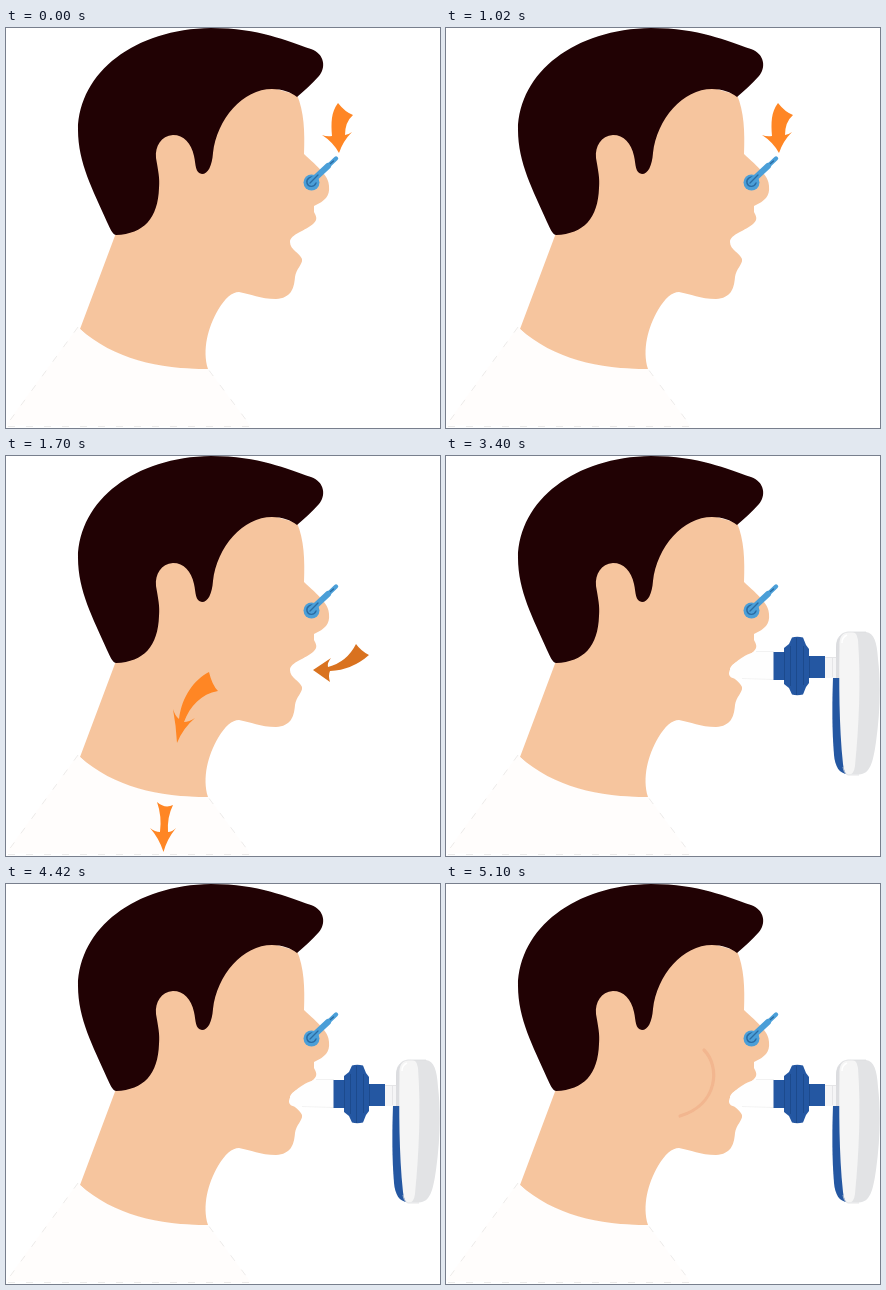
An HTML page with a canvas for the animation above (6800 ms loop, 434 by 400 pixels).

```html
<!DOCTYPE html>
<html lang="en">
<head>
<meta charset="utf-8">
<style>
html, body { margin: 0; width: 100%; height: 100%; overflow: hidden; background: #fff; }
canvas { display: block; }
</style>
</head>
<body>
<canvas id="stage" width="434" height="400"></canvas>
<script>
const ctx = document.getElementById('stage').getContext('2d');
const STEP = 1700;
const ORANGE = '#ff8624', RUST = '#d9721f', BLUE = '#2457a2', NAVY = '#1b4788';
const SKY = '#4b9fd8', STEEL = '#2a6ca3';

function fill(color, d) {
  ctx.fillStyle = color;
  ctx.fill(new Path2D(d));
}

function line(color, width, d) {
  ctx.strokeStyle = color;
  ctx.lineWidth = width;
  ctx.stroke(new Path2D(d));
}

function disc(color, x, y, r) {
  ctx.fillStyle = color;
  ctx.beginPath();
  ctx.arc(x, y, r, 0, Math.PI * 2);
  ctx.fill();
}

function drawPerson() {
  // neck and face
  fill('#f6c59e', `M110 205L74 301C105 332 150 342 202 341
    C196 322 202 299 212 282C219 270 226 264 233 264
    C245 266 254 271 270 271C285 270 288 261 289 249
    C290 241 297 236 296 231C294 225 284 222 284 214
    C284 206 300 203 308 195C312 191 310 188 308 184L308 178
    C319 173 324 168 323 158C323 148 312 139 298 126
    C299 104 298 83 291 67L200 40L130 110Z`);
  // hair
  fill('#210204', `M110 207C106 206 104 200 101 194C87 162 72 135 72 102
    C73 44 129 1 205 0C254 0 280 13 305 21C319 26 320 40 313 48
    C306 56 298 63 291 69C285 64 276 61 266 61C237 61 211 91 207 125
    C206 138 202 146 196 146C189 145 190 137 188 128
    C185 115 178 107 167 107C155 108 149 118 150 130
    C152 142 154 150 153 160C152 190 138 206 110 207Z`);
  // shirt
  fill('#fffdfc', 'M72 299L0 397L245 399L202 341C152 341 108 331 74 301Z');
  ctx.setLineDash([7, 11]);
  line('#e4e2e1', 0.7, 'M72 299L1 396.500M2 398.500H245L202 341');
  ctx.setLineDash([]);
}

function drawClip() {
  ctx.lineCap = 'round';
  disc(SKY, 305.500, 154.500, 8);
  line(STEEL, 1.400, 'M309 150C305 147 300 151 301 155C302 159 308 160 310 155');
  line(SKY, 6, 'M307 152L322 138');
  line(SKY, 4.400, 'M320 140L330 130.500');
  line(STEEL, 1.300, 'M304 155L312 147M324.500 135.500L327.500 133');
  ctx.lineCap = 'butt';
}

function drawBreath() {
  fill(RUST, `M350 188Q355 195 363 199Q346 214 324 215Q322 219 324 226
    L307 214L325 202Q321 207 322 211Q341 206 350 188Z`);
  fill(ORANGE, `M203 216Q206 229 212 235C195 238 184 250 178 266
    Q183 266 189 262Q177 272 171 287Q170 269 167 253Q169 260 173 263
    C176 240 188 224 203 216Z`);
  fill(ORANGE, `M151 346Q159 353 167 349Q161 361 162 376Q166 376 170 372
    Q161 383 157.500 396Q153 382 144 372Q149 376 154 376Q156 360 151 346Z`);
}

function drawDevice() {
  // mouthpiece
  fill('#fefefe', 'M328 195H312C298 198 283 209 283 218C284 224 293 223 302 222L328 224Z');
  line('#eeeeee', 0.7, 'M328 195.500H310M296 222.500L328 223.500');
  // filter
  fill(BLUE, `M327.500 196H338V192L343 188L346 181.500Q351 180 357 181.500L360 189L363 193V200H379V222
    H363V227L360 231L357 238.500Q351 240 346 238.500L343 232L338 228V224H327.500Z`);
  line(NAVY, 0.8, 'M338.500 196V224M344.500 190V230M350.500 182V239M357.500 190V229M363.500 200V222');
  fill('#f5f5f6', 'M379 201H392V222H379Z');
  line('#dedfe1', 0.7, 'M379 201.500H391M386.500 202V221');
  // meter
  fill('#dcdde0', 'M390 224V192Q390 181 398 177V224Z');
  fill(BLUE, 'M387 222H396L402 318C393 318 389 310 388 299C386 275 386 248 387 222Z');
  fill('#e2e3e5', `M405 176L420 176C428 177 431 186 432 203C435 227 434 258 430 286
    C427 307 424 318 413 318.500H403Z`);
  fill('#f5f5f5', `M393.500 190C393 181 396 177 402 176Q411 174 412 184
    C415 225 413 270 409 310Q408 319 402 319Q398 318 397 308C393 270 393 225 393.500 190Z`);
  line('#d8dadd', 0.7, `M390.500 201V190C391 181 395 177 402 176L420 176
    M397 311Q398 318 402 319H413`);
  line('#ffffff', 1.500, 'M396 187Q396 181 401 179');
}

function draw(time) {
  const phase = Math.floor(time / STEP) % 4;
  ctx.fillStyle = '#fff';
  ctx.fillRect(0, 0, 434, 400);
  drawPerson();
  if (phase === 0) {
    fill(ORANGE, `M332 75Q339 84 347 87Q339 94 339 107Q342 107 346 104
      Q337 113 333 125Q327 114 316 107Q321 109 326 108C325 95 325 84 332 75Z`);
  }
  if (phase === 1) drawBreath();
  if (phase >= 2) drawDevice();
  if (phase === 3) {
    ctx.lineCap = 'round';
    line('#f2b68f', 3.200, 'M258 166C274 182 273 220 234 232');
  }
  drawClip();
}

const start = performance.now();
function tick() {
  draw(performance.now() - start);
  requestAnimationFrame(tick);
}
tick();
</script>
</body>
</html>
```
